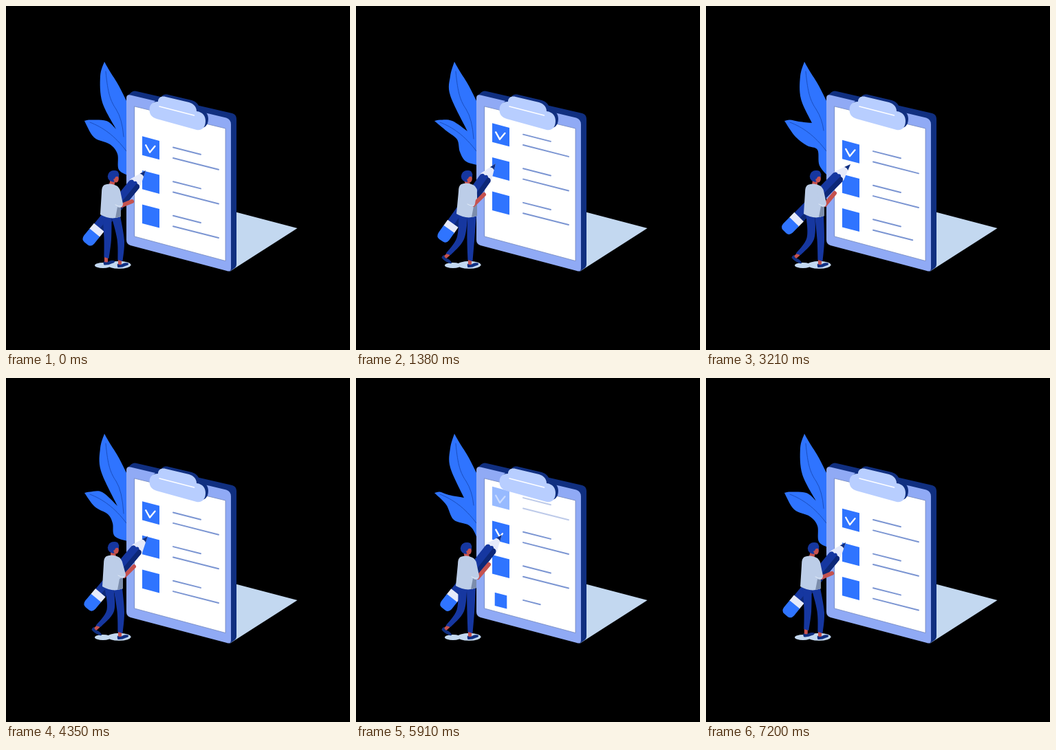
Write an HTML page with a canvas that moves like this. It is 500 px wide and 500 px high and loops after 7230 ms.

```html
<!DOCTYPE html>
<html lang="en">
<head>
<meta charset="utf-8">
<title>Checklist</title>
<style>
html, body { margin: 0; width: 100%; height: 100%; overflow: hidden; background: #000; }
canvas { display: block; width: 500px; height: 500px; }
</style>
</head>
<body>
<canvas id="stage" width="500" height="500"></canvas>
<script>
const ctx = document.getElementById('stage').getContext('2d');
const LOOP = 7230, CYCLE = LOOP / 2, PITCH = 49.6;
const BLUE = '#2f74ff', NAVY = '#102f80', TROUSERS = '#1637a0', SKIN = '#c5524f',
  SHIRT = '#bccde8', PALE = '#c3d8f0', INK = '#7b95d2';

// Rows: phase, head, neck, hip, elbow, hand, pencil tip, pencil end
const body = [
  [0,    156, 248, 152, 261, 152, 305, 168, 290, 183, 284, 203, 239, 122, 338],
  [735,  156, 247, 155, 260, 155, 305, 172, 288, 186, 274, 206, 230, 124, 328],
  [1380, 161, 248, 162, 260, 161, 304, 171, 289, 186, 274, 203, 229, 129, 333],
  [2080, 160, 248, 161, 261, 160, 304, 175, 290, 190, 275, 208, 233, 132, 331],
  [2295, 160, 248, 161, 261, 160, 304, 177, 290, 193, 271, 212, 228, 134, 327],
  [2490, 163, 248, 160, 261, 159, 304, 176, 289, 190, 272, 210, 228, 130, 325],
  [3210, 159, 248, 157, 261, 157, 304, 173, 289, 187, 272, 210, 230, 121, 321]
];
// Rows: phase, upper bulge, notch, top of lower leaf, four points below it, bottom y
const leaf = [
  [0,    140, 140, 160, 179, 146, 167, 128, 191, 151, 201, 162, 215, 164, 238, 247],
  [735,  138, 135, 162, 186, 140, 166, 129, 187, 148, 198, 155, 211, 158, 230, 238],
  [1380, 137, 130, 162, 182, 140, 167, 132, 182, 147, 194, 151, 212, 160, 226, 232],
  [2295, 137, 130, 157, 174, 135, 170, 131, 184, 142, 206, 164, 214, 174, 228, 250],
  [2490, 139, 140, 157, 173, 135, 170, 130, 185, 142, 206, 163, 212, 172, 226, 255],
  [3210, 138, 135, 154, 170, 135, 168, 130, 190, 147, 203, 162, 209, 165, 232, 250]
];

const clamp = x => Math.max(0, Math.min(1, x));
const mix = (a, b, k) => a + (b - a) * k;
const ease = x => { x = clamp(x); return x * x * (3 - 2 * x); };

// Periodic monotone cubic through the key rows; returns points
function pose(rows, p) {
  const n = rows.length;
  const at = i => rows[(i + n) % n];
  const time = i => at(i)[0] + Math.floor(i / n) * CYCLE;
  let i = n - 1;
  while (rows[i][0] > p) i--;
  const slope = (k, c) => (at(k + 1)[c] - at(k)[c]) / (time(k + 1) - time(k));
  const tangent = (k, c) => {
    const a = slope(k - 1, c), b = slope(k, c);
    return a * b > 0 ? 2 * a * b / (a + b) : 0;
  };
  const h = time(i + 1) - time(i), u = (p - time(i)) / h, v = 1 - u;
  const out = [];
  for (let c = 1; c < rows[0].length; c++) {
    const value = at(i)[c] * v * v * (1 + 2 * u) + at(i + 1)[c] * u * u * (3 - 2 * u)
      + h * u * v * (v * tangent(i, c) - u * tangent(i + 1, c));
    if (c % 2) out.push([value]); else out[out.length - 1].push(value);
  }
  return out;
}

function fill(shape, color) {
  ctx.fillStyle = color;
  ctx.fill(typeof shape === 'string' ? new Path2D(shape) : shape);
}
function stroke(shape, color, width) {
  ctx.strokeStyle = color;
  ctx.lineWidth = width;
  ctx.stroke(typeof shape === 'string' ? new Path2D(shape) : shape);
}
const poly = pts => 'M' + pts.join('L') + 'Z';
function ellipse(x, y, rx, ry, color) {
  const e = new Path2D();
  e.ellipse(x, y, rx, ry, 0, 0, 7);
  fill(e, color);
}
// Smooth curve through points, continuing from the first one
function curve(pts) {
  let d = '';
  for (let i = 0; i < pts.length - 1; i++) {
    const a = pts[i], b = pts[i + 1], p = pts[i - 1] || a, q = pts[i + 2] || b;
    d += `C${a[0] + (b[0] - p[0]) / 6},${a[1] + (b[1] - p[1]) / 6} ` +
      `${b[0] - (q[0] - a[0]) / 6},${b[1] - (q[1] - a[1]) / 6} ${b}`;
  }
  return d;
}

function drawLeaves(p) {
  const [bulge, notch, top, b1, b2, b3, b4, [bottom]] = pose(leaf, p);
  const tip = [143, 81], low = [114, 167];
  fill('M' + tip + curve([tip, [137, 102], bulge, notch]) + curve([notch, top, [122, 165.5], low]) +
    curve([low, b1, b2, b3, b4, [180, bottom]]) + 'L180,148' +
    curve([[180, 148], [164, 116], [151, 95], tip]) + 'Z', BLUE);
  stroke('M145,95C148,128 152,138 160,150Q169,164 171,' + (notch[1] + 11), '#1b4fc0', 1);
  stroke('M122,169C140,176 158,188 175,211', '#1b4fc0', 1);
}

function drawBoard() {
  fill('M176,131L182,125.5Q186,122.5 190,124L329,156Q335,158 335,164V375Q335,379 332,381L325,386Z', NAVY);
  fill('M175,134Q175,128 181,129.5L320,162.5Q327,165 327,172V381Q327,387 321,385L181,348Q175,346 175,340Z', '#90aaf5');
  fill('M187,146L319,178V370.5L187,335Z', '#fff');
  stroke('M187,146L319,178V370.5L187,335Z', '#7187bd', 0.8);
}

function drawItem(n, t) {
  const y = 189.3 + PITCH * n - 2 * PITCH * t / LOOP;
  const age = t - [-9e3, -9e3, -9e3, 2360, 5630][n];
  const alpha = clamp((y - 155.1) / 5.4);
  if (age <= 0 || !alpha) return;
  ctx.save();
  ctx.globalAlpha = alpha;
  const s = clamp(age / 400), w = 12.5 * s, h = 13.7 * s, cy = y + 17, k = 3.3 * s;
  fill(poly([[210.5 - w, cy - h - k], [210.5 + w, cy - h + k], [210.5 + w, cy + h + k], [210.5 - w, cy + h - k]]), BLUE);
  const rule = (dy, len, part) => {
    if (part > 0) stroke(`M243,${y + dy}l${len * part},${len * part * 0.255}`, INK, 2);
  };
  rule(16.3, 40, clamp((age - 120) / 260));
  rule(31.7, 66, clamp((age - 400) / 520));
  const tick = n < 1 ? 1 : clamp((t - 1900 - (n - 1) * CYCLE) / 520);
  if (tick > 0) {
    const a = clamp(tick * 2), b = clamp(tick * 2 - 1);
    stroke(`M203.2,${y + 13}l${5.8 * a},${10.5 * a}l${7.5 * b},${-9 * b}`, '#fff', 2.3);
  }
  ctx.restore();
}

function drawClip() {
  const d = 'M221,139C221,133 226,130.5 232,132L266,140C273,142 277,147 277,153C286,154 290,160 290,167' +
    'C290,176 285,181.5 277,180L219,164C212,162 208,157 208.5,150C209,143 213,139 221,139Z';
  ctx.save();
  ctx.translate(4, -3);
  fill(d, NAVY);
  ctx.restore();
  fill(d, '#b8ceff');
  stroke('M223,146L273.5,159', '#fff', 1.5);
}

function drawPencil(tip, end) {
  ctx.save();
  ctx.translate(...tip);
  ctx.rotate(Math.atan2(tip[1] - end[1], tip[0] - end[0]));
  fill('M0,0L-23,-9H-28V9H-23Z', '#e6eafa');
  fill('M0,0L-9,-3.6Q-7,0 -9,3.6Z', NAVY);
  fill('M-108,-9H-26Q-21,-7 -23,-3Q-19,0 -23,3Q-21,7 -26,9H-108Z', TROUSERS);
  fill('M-108,2H-23Q-21,7 -26,9H-108Z', '#0d2878');
  fill('M-107,-9.5V9.5H-118V-9.5Z', '#e6eafa');
  fill('M-117,-9.5V9.5H-130Q-137,9 -137,3V-3Q-137,-9 -130,-9.5Z', BLUE);
  ctx.restore();
}

function drawLeg(hip, knee, ankle) {
  const [a, b] = [hip, ankle];
  const left = [[a[0] - 6.5, a[1]], [knee[0] - 5.5, knee[1]], [b[0] - 3.5, b[1] - 1]];
  const right = [[b[0] + 3.5, b[1] + 1], [knee[0] + 5, knee[1] + 2], [a[0] + 6.5, a[1]]];
  fill('M' + left[0] + curve(left) + 'L' + right[0] + curve(right) + 'Z', TROUSERS);
}

function drawShoe(x, y, angle) {
  ctx.save();
  ctx.translate(x, y);
  ctx.rotate(angle);
  fill('M-2.5,-4H2.5V4H-2.5Z', SKIN);
  fill('M-3.5,2Q0,5 4,2Q9,0 12.5,1.5Q13,4 9,5Q3,8 -3,7.5Q-4.5,5 -3.5,2Z', NAVY);
  ctx.restore();
}

function drawPerson(p) {
  const [head, neck, hip, elbow, hand, tip, end] = pose(body, p);
  const step = ease(1 - Math.min(p, CYCLE - p) / 390);
  const [nx, ny] = neck, [hx, hy] = hip, [x, y] = head;
  ellipse(141, 377, 12, 4, PALE);
  ellipse(164.5, 376.3, 17, 5.5, PALE);
  drawPencil(tip, end);

  const ankle = [mix(134, 146, step), mix(361, 366, step)];
  drawShoe(mix(132, 145.5, step), mix(363, 369, step), mix(0.85, 0, step));
  drawLeg([hx - 5, hy], [mix(152, 148, step), 337], ankle);
  drawShoe(165.5, 372.5, 0);
  drawLeg([hx + 7.5, hy], [167, 339], [166, 370]);

  fill(poly([[x - 4, y + 4], [x + 3, y + 6], [nx + 5, ny + 1], [nx - 3, ny + 1]]), SKIN);
  fill(`M${nx - 9},${ny - 1}Q${nx},${ny - 5} ${nx + 10},${ny + 1}Q${nx + 14},${ny + 4} ${nx + 14},${ny + 15}` +
    `L${hx + 15},${hy + 1}Q${hx},${hy + 7} ${hx - 15},${hy - 2}L${nx - 13},${ny + 10}` +
    `Q${nx - 13},${ny + 1} ${nx - 9},${ny - 1}Z`, SHIRT);
  fill(`M${hx + 10},${hy - 13}L${hx + 15},${hy - 16}V${hy + 1}L${hx + 7},${hy + 3}Z`, '#7c8dac');

  stroke(`M${elbow}L${hand}`, SKIN, 6);
  stroke(`M${nx + 9},${ny + 8}L${elbow[0] - 3},${elbow[1] - 2}`, SHIRT, 10);
  stroke(`M${elbow[0] - 9},${elbow[1] - 1}q4,3 9,2`, '#e6eef9', 0.9);

  ellipse(x, y - 0.5, 8.2, 8.3, TROUSERS);
  ellipse(x + 4, y + 3.2, 3.8, 5.2, SKIN);
  fill(`M${x - 6},${y - 6}Q${x},${y - 11} ${x + 6},${y - 8}Q${x + 10},${y - 3} ${x + 7},${y}` +
    `Q${x + 3},${y - 1} ${x + 2},${y + 3}Q${x - 2},${y + 5} ${x - 6},${y}Z`, TROUSERS);
}

function draw(now) {
  const t = now % LOOP, p = t % CYCLE;
  ctx.fillStyle = '#000';
  ctx.fillRect(0, 0, 500, 500);
  ctx.lineCap = ctx.lineJoin = 'round';
  fill('M334,299.5L423.5,323L325,386Z', PALE);
  drawLeaves(p);
  drawBoard();
  for (let n = 0; n < 5; n++) drawItem(n, t);
  drawClip();
  drawPerson(p);
}

const start = performance.now();
function frame() {
  draw(performance.now() - start);
  requestAnimationFrame(frame);
}
frame();
</script>
</body>
</html>
```
